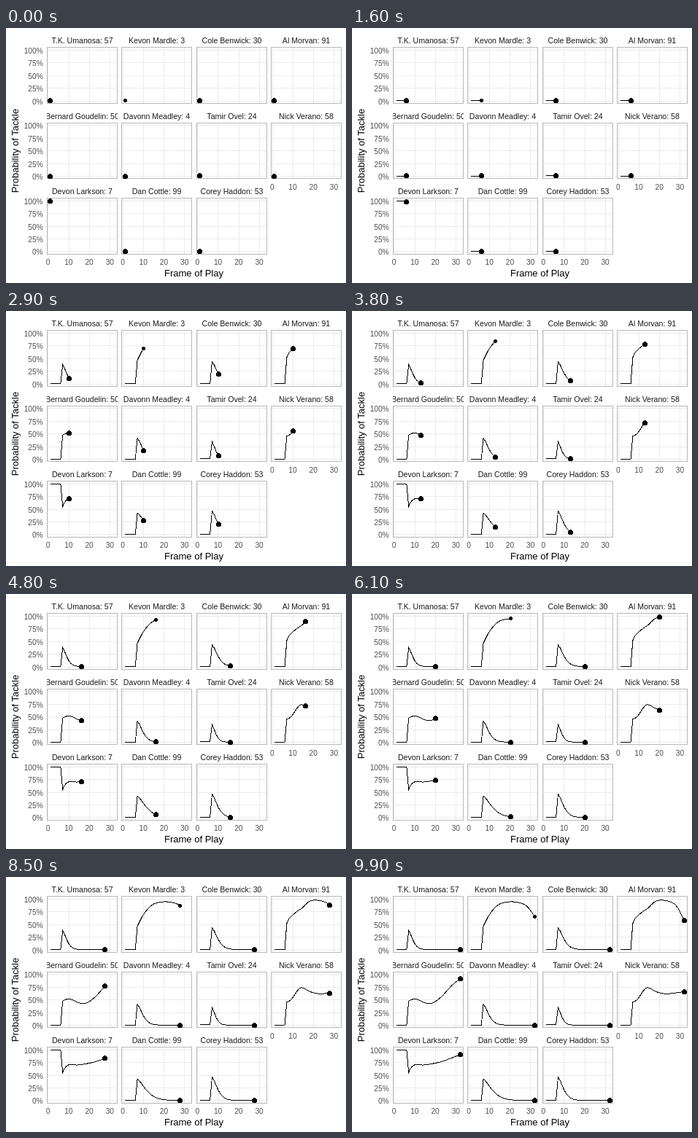
An HTML page that plays this animation: 466 by 350 pixels, repeating every 10000 ms.

```html
<!DOCTYPE html>
<html lang="en">
<head>
<meta charset="utf-8">
<title>Probability of Tackle</title>
<style>
html, body { margin: 0; width: 100%; height: 100%; overflow: hidden; background: #fff; }
svg { display: block; shape-rendering: crispEdges; }
text { font: 10.2px "Liberation Sans", Arial, sans-serif; fill: #4d4d4d; text-anchor: middle; }
.strip { font-size: 10.6px; fill: #1a1a1a; }
.title { font-size: 13px; fill: #000; }
.tick { text-anchor: end; }
.grid { stroke: #ebebeb; }
.frame { fill: none; stroke: #b8b8b8; }
.line { fill: none; stroke: #000; }
</style>
</head>
<body>
<svg id="chart" width="466" height="350" viewBox="0 0 466 350"></svg>
<script>
const unit = 2.822, lastPlay = 32, steps = 100, snapPlay = 7;
const snap = v => Math.round(v) + .5;
const text = (x, y, s, cls = '', more = '') =>
  `<text x="${x}" y="${y}" class="${cls}" ${more}>${s}</text>`;
const rule = (x1, y1, x2, y2) => `<path class="grid" d="M${x1} ${y1}L${x2} ${y2}"/>`;

// Chance that peaks at the snap and dies away
const fade = (peak, width, floor = .5) => play =>
  floor + (peak - floor) * Math.exp(-(((play - snapPlay) / width) ** 1.45));

// Smooth curve through [play, percent] points
const through = (...points) => {
  const at = i => points[Math.max(0, Math.min(i, points.length - 1))];
  const slope = i => (at(i + 1)[1] - at(i - 1)[1]) / (at(i + 1)[0] - at(i - 1)[0]);
  return play => {
    const i = Math.max(0, points.findIndex(p => p[0] >= play) - 1);
    const [x0, y0] = at(i), [x1, y1] = at(i + 1), w = x1 - x0, t = (play - x0) / w, u = 1 - t;
    return y0 * u * u * (1 + 2 * t) + y1 * t * t * (1 + 2 * u) +
      w * t * u * (slope(i) * u - slope(i + 1) * t);
  };
};

// Name, percent before the snap, curve after it
const players = [
  ['T.K. Umanosa: 57', 1, fade(38, 2.65, 1)],
  ['Kevon Mardle: 3', 1, through([7, 47], [10, 70], [14, 88], [18, 94], [23, 94], [28, 86.5], [32, 65.5])],
  ['Cole Benwick: 30', 1, fade(44, 3.55, 1)],
  ['Al Morvan: 91', 1, through([7, 52], [8, 61], [12, 76], [14, 81], [18, 95.5], [23, 97], [28, 87.5], [32, 58.5])],
  ['Bernard Goudelin: 50', .5, through([7, 48], [10, 52], [17, 42.5], [22, 53], [28, 78.5], [32, 91.5])],
  ['Davonn Meadley: 4', .5, fade(42, 3.36)],
  ['Tamir Ovel: 24', 1.5, fade(35, 2.25)],
  ['Nick Verano: 58', .5, through([7, 45.5], [9, 50], [13, 72], [15, 73.5], [18, 66.5], [23, 62], [32, 66])],
  ['Devon Larkson: 7', 99, through([7, 55.5], [8, 64], [10, 70.5], [14, 70], [22, 75.5], [28, 84], [32, 90.5])],
  ['Dan Cottle: 99', .5, fade(42, 5.5)],
  ['Corey Haddon: 53', .5, fade(46.5, 3.42)]
];

let markup = text(257.5, 341, 'Frame of Play', 'title') +
  text(0, 0, 'Probability of Tackle', 'title', 'transform="translate(17.3 168.5) rotate(-90)"');

const panels = players.map(([name, before, after], i) => {
  const col = i % 4, row = i >> 2;
  const left = 55.9 + col * 102.38, zero = 99.75 + row * 103.35;
  const x = play => left + (play + .55) * unit;
  const y = pct => zero - pct * .699;
  const px = snap(left), top = snap(zero - 73.5), bottom = snap(zero + 3.35);

  for (const p of [0, 25, 50, 75, 100]) {
    markup += rule(px, snap(y(p)), px + 96, snap(y(p)));
    if (!col) markup += text(50.7, snap(y(p)) + 4, p + '%', 'tick');
  }
  for (const n of [0, 10, 20, 30]) {
    markup += rule(snap(x(n)), top, snap(x(n)), bottom);
    if (i > 6) markup += text(x(n) + .2, zero + 18.5, n);
  }
  markup += `<svg x="${px - .5}" y="${top - 16.5}" width="97" height="16">${text(48.5, 10.5, name, 'strip')}</svg>
    <rect class="frame" x="${px}" y="${top}" width="96" height="${bottom - top}"/>
    <path class="line" transform="translate(.5 .5)"/><circle r="${i === 1 ? 2.5 : 3.5}"/>`;
  return { x, y, value: play => play < snapPlay ? before : after(play) };
});

chart.innerHTML = markup;
const lines = chart.querySelectorAll('.line'), dots = chart.querySelectorAll('circle');

function draw() {
  const step = Math.floor(performance.now() / 100) % steps;
  const now = 1 + step * (lastPlay - 1) / (steps - 1);
  const whole = Math.floor(now), next = Math.min(whole + 1, lastPlay);
  panels.forEach(({ x, y, value }, i) => {
    const from = value(whole);
    const cx = x(now), cy = y(from + (value(next) - from) * (now - whole));
    let d = 'M';
    for (let play = 1; play <= whole; play++) d += `${x(play)} ${y(value(play))}L`;
    lines[i].setAttribute('d', `${d}${cx} ${cy}`);
    dots[i].setAttribute('cx', snap(cx));
    dots[i].setAttribute('cy', snap(cy));
  });
  requestAnimationFrame(draw);
}
draw();
</script>
</body>
</html>
```
